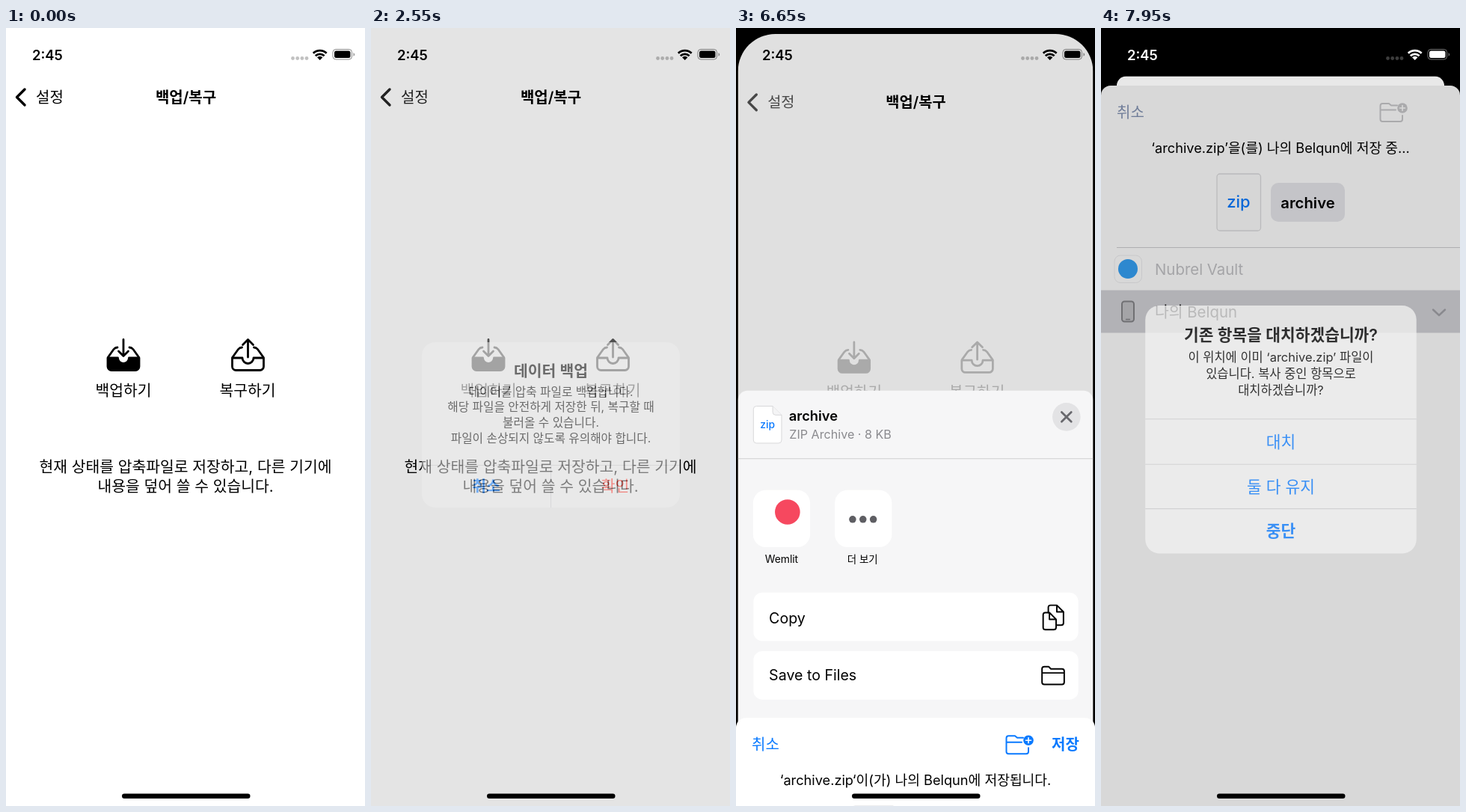
Animation, 480 px wide and 1040 px high, one loop 8000 ms. Source, as an HTML page:

```html
<!DOCTYPE html>
<html lang="ko">
<head>
<meta charset="utf-8">
<title>백업/복구</title>
<style>
  html, body { margin: 0; width: 100%; height: 100%; overflow: hidden; background: #000; }
  svg { display: block; width: 100%; height: 100%; }
  text { font: 20.4px Inter, 'Noto Sans CJK KR', sans-serif; fill: currentColor; }
  .mid { text-anchor: middle; }
  .bold { font-weight: 600; }
  .msg text { font-size: 15.7px; }
  .line { fill: none; stroke: currentColor; stroke-width: 2.8; stroke-linecap: round; stroke-linejoin: round; }
  .thin { stroke-width: 2; }
  .rule { stroke: #cfcfd1; stroke-width: 1; }
  .blue { color: #0a7aff; }
  .red { color: #ff3b30; }
  .grey { color: #8a8a8e; }
  .busy .cancel { color: #8494b4; }
  .busy .folder { color: #c8c8cb; }
  .busy .phone { color: #848488; }
</style>
</head>
<body>
<svg viewBox="0 0 480 1040">
  <defs>
    <clipPath id="cardClip"><rect id="cardShape" width="480" height="1040"/></clipPath>
    <path id="tray" d="M136.500 440L144 429.500Q146 427 149 427M165 427Q168 427 170 429.500L177.500 440"/>
    <path id="box" d="M136 441H149.500a7.500 7.500 0 0 0 15 0H178V452.500a5 5 0 0 1-5 5H141a5 5 0 0 1-5-5Z"/>
  </defs>
  <rect width="480" height="1040"/>

  <g id="card" clip-path="url(#cardClip)">
    <rect width="480" height="1040" fill="#fff"/>
    <rect width="480" height="1040" id="pageDim"/>
    <g id="back">
      <path class="line" style="stroke-width:3.4" d="M25 82L14.500 92.500L25 103"/>
      <text x="40" y="99.500" style="font-size:20px">설정</text>
    </g>
    <text class="mid bold" x="240.500" y="99.500" style="font-size:20px">백업/복구</text>
    <g id="actions">
      <g class="line">
        <use href="#tray"/>
        <use href="#box" fill="currentColor"/>
        <path d="M157 416.500V437M150.500 432L157 438.500L163.500 432"/>
        <g transform="translate(166.500 0)">
          <use href="#tray"/>
          <use href="#box"/>
          <path d="M157 417V440M150 423.500L157 416.500L164 423.500"/>
        </g>
      </g>
      <text class="mid" x="157" y="491.500">백업하기</text>
      <text class="mid" x="323" y="491.500">복구하기</text>
    </g>
    <text class="mid" x="240" y="593.500">현재 상태를 압축파일로 저장하고, 다른 기기에</text>
    <text class="mid" x="240" y="620">내용을 덮어 쓸 수 있습니다.</text>

    <g id="share">
      <rect y="482" width="480" height="620" rx="13" fill="#f6f6f7"/>
      <path d="M21 507a4 4 0 0 1 4-4H47L59 515V549a4 4 0 0 1-4 4H25a4 4 0 0 1-4-4Z" fill="#fff" stroke="#d8d8da"/>
      <path d="M47 503V511a4 4 0 0 0 4 4H59" fill="#f4f4f5" stroke="#d8d8da"/>
      <text class="mid blue" x="40" y="533" style="font-size:14px;font-weight:500">zip</text>
      <text class="bold" x="69" y="522.500" style="font-size:18.500px">archive</text>
      <text class="grey" x="69.500" y="547" style="font-size:16.300px">ZIP Archive · 8 KB</text>
      <circle cx="444" cy="517.500" r="19" fill="#e3e3e5"/>
      <path class="line" d="M437.500 511L450.500 524M450.500 511L437.500 524" style="color:#68686d"/>
      <path class="rule" d="M0 574H480"/>
      <g fill="#fff">
        <rect x="20.500" y="616.500" width="77" height="77" rx="17"/>
        <rect x="131" y="616.500" width="77" height="77" rx="17"/>
        <rect x="21" y="755" width="439" height="65.500" rx="12"/>
        <rect id="saveRow" x="21" y="834" width="439" height="65.500" rx="12"/>
      </g>
      <circle cx="67" cy="646" r="17" fill="#f6485f"/>
      <g fill="#5e5e63">
        <circle cx="155" cy="656" r="4.800"/><circle cx="169" cy="656" r="4.800"/><circle cx="183" cy="656" r="4.800"/>
      </g>
      <text class="mid" x="59" y="714.500" style="font-size:14px">Wemlit</text>
      <text class="mid" x="168.500" y="714.500" style="font-size:13.600px">더 보기</text>
      <text x="42" y="796.500" style="font-size:19.800px">Copy</text>
      <text x="42" y="873.500" style="font-size:19.800px">Save to Files</text>
      <g class="line thin">
        <path d="M412.500 785a3 3 0 0 1 3-3H421L430 791V802a3 3 0 0 1-3 3H415.500a3 3 0 0 1-3-3ZM421 782V791H430"/>
        <path d="M419.500 782V775a3 3 0 0 1 3-3H431L440 781V796a3 3 0 0 1-3 3H430M431 772V781H440"/>
        <path d="M411 875V858a3 3 0 0 1 3-3H420L423 858H438a3 3 0 0 1 3 3V876a3 3 0 0 1-3 3H414a3 3 0 0 1-3-3ZM411 863.500H441"/>
      </g>
    </g>
  </g>

  <g id="files">
    <rect y="77" width="480" height="1000" rx="13" fill="#fff"/>
    <text class="blue cancel" x="21" y="120" style="font-size:20px">취소</text>
    <g id="folder" class="blue folder">
      <path class="line thin" d="M384 103.500H376L373 101H364.500a3 3 0 0 0-3 3V122a3 3 0 0 0 3 3H388a3 3 0 0 0 3-3V117M361.500 109.500H382"/>
      <circle cx="391" cy="107" r="6.800" fill="currentColor"/>
      <path class="line" d="M387.500 107H394.500M391 103.500V110.500" style="stroke:#fff;stroke-width:1.600"/>
    </g>
    <text id="save" class="blue bold" x="422" y="120" style="font-size:20px">저장</text>
    <text id="info" class="mid" x="240" y="167" style="font-size:18.200px"></text>
    <rect x="155" y="195" width="58.500" height="76" rx="4" fill="#fdfdfd" stroke="#dcdcde" stroke-width="1.300"/>
    <text class="mid blue" x="184" y="240" style="font-size:22px;font-weight:500">zip</text>
    <rect x="227" y="207" width="99" height="52" rx="10" fill="#e7e7ec"/>
    <text class="mid bold" x="276.500" y="240.500" style="font-size:20.300px">archive</text>
    <path class="rule" d="M21 293.500H480"/>
    <rect x="18" y="304" width="36.500" height="36.500" rx="8" fill="#fff" stroke="#ececee"/>
    <circle cx="36" cy="322" r="13" fill="#35a0f4"/>
    <text x="72" y="330" style="color:#c2c2c5">Nubrel Vault</text>
    <rect y="350.500" width="480" height="57" fill="#d2d2d7"/>
    <g class="blue phone">
      <rect x="28" y="365.500" width="16" height="27" rx="3.500" fill="currentColor" fill-opacity=".22" stroke="currentColor" stroke-width="2"/>
      <path class="line" d="M33.500 389.500H38.500" style="stroke-width:1.300"/>
    </g>
    <text x="72" y="386.500">나의 Belqun</text>
    <path class="line" d="M444 376.500L452 384L460 376.500" style="color:#a2a2a8;stroke-width:2.400"/>
  </g>

  <path id="screenDim"/>

  <g id="status">
    <text class="bold" x="35" y="42.500" style="font-size:18.400px">2:45</text>
    <g fill="currentColor">
      <g opacity=".24"><circle cx="383.500" cy="40.500" r="2.400"/><circle cx="389.700" cy="40.500" r="2.400"/><circle cx="395.900" cy="40.500" r="2.400"/><circle cx="402" cy="40.500" r="2.400"/></g>
      <path d="M416 39.300a5 5 0 0 1 7.400 0L419.700 43Z"/>
      <rect x="439" y="30.500" width="21.500" height="9.500" rx="2.500"/>
      <path d="M464.500 33a2.600 2.600 0 0 1 0 4.800Z" opacity=".45"/>
    </g>
    <path class="line" style="stroke-width:2.800;stroke-linecap:butt" d="M410.800 33.800a12.600 12.600 0 0 1 17.800 0M413.800 37.200a8.400 8.400 0 0 1 11.800 0"/>
    <rect x="437" y="28.500" width="25.500" height="13.500" rx="4" fill="none" stroke="currentColor" opacity=".45"/>
  </g>

  <g id="backupAlert">
    <rect x="68" y="420" width="345" height="221" rx="18" fill="#eee"/>
    <text class="mid bold" x="240.500" y="465.500">데이터 백업</text>
    <g class="mid msg">
      <text x="240.500" y="491.500">데이터를 압축 파일로 백업합니다.</text>
      <text x="240.500" y="512">해당 파일을 안전하게 저장한 뒤, 복구할 때</text>
      <text x="240.500" y="532.500">불러올 수 있습니다.</text>
      <text x="240.500" y="553.500">파일이 손상되지 않도록 유의해야 합니다.</text>
    </g>
    <path class="rule" d="M68 584.500H413M240.500 584.500V641"/>
    <text class="mid bold blue" x="154" y="620">취소</text>
    <text class="mid red" x="326.500" y="620">확인</text>
  </g>

  <g id="replaceAlert">
    <rect x="68" y="379" width="345" height="315.500" rx="18" fill="#f2f2f2"/>
    <text class="mid bold" x="240.500" y="424">기존 항목을 대치하겠습니까?</text>
    <g class="mid msg">
      <text x="240.500" y="450">이 위치에 이미 ‘archive.zip’ 파일이</text>
      <text x="240.500" y="471">있습니다. 복사 중인 항목으로</text>
      <text x="240.500" y="492">대치하겠습니까?</text>
    </g>
    <path class="rule" d="M68 523.500H413M68 581H413M68 637.500H413"/>
    <g class="mid blue">
      <text x="240.500" y="560">대치</text>
      <text x="240.500" y="617">둘 다 유지</text>
      <text class="bold" x="240.500" y="673.500">중단</text>
    </g>
  </g>

  <rect x="155" y="1023.500" width="171.500" height="6.500" rx="3.250"/>
</svg>
<script>
  const LOOP = 8000, STEP = 50;
  const FULL = 'M0 0H480V1040H0Z';
  const SHEET = 'M0 1040V90Q0 77 13 77H467Q480 77 480 90V1040Z';
  const el = id => document.getElementById(id);
  const set = (id, attrs) => {
    for (const k in attrs) el(id).setAttribute(k, attrs[k]);
  };
  const grey = v => `color:rgb(${[v, v, v].map(Math.round)})`;

  // Critically damped spring, 0 to 1
  const spring = (t, start, rate = 18) => {
    const x = Math.max(0, t - start) / 1000 * rate;
    return x > 9.5 ? 1 : 1 - (1 + x) * Math.exp(-x);
  };

  // Alerts shrink into place around their centre
  function placeAlert(id, cy, grow, alpha) {
    const s = 1.215 - 0.215 * grow;
    set(id, {
      opacity: alpha,
      transform: `translate(240.5 ${cy}) scale(${s}) translate(-240.5 ${-cy})`
    });
  }

  function draw(t) {
    const grow = spring(t, 917);
    const leave = t >= 2900 ? 1 : spring(t, 2390, 10);
    const backup = grow * (1 - leave);
    const share = spring(t, 4417);
    const files = spring(t, 6616.6);
    const replace = spring(t, 7796);
    const saving = t >= 7700;
    const tint = Math.max(backup, share);

    placeAlert('backupAlert', 530.5, grow, backup);
    placeAlert('replaceAlert', 536.5, replace, replace);
    set('screenDim', { opacity: 0.2 * Math.max(backup, replace), d: saving ? SHEET : FULL });

    const s = 1 - 0.0875 * files;
    set('card', { transform: `translate(${240 * (1 - s)} ${64.4 * files}) scale(${s})` });
    set('cardShape', { rx: files > 0 ? 56 - 42 * files : 0 });
    set('pageDim', { opacity: 0.12 * share - 0.04 * replace });
    set('back', { style: grey(72 * tint) });
    set('actions', { style: grey(170 * tint) });
    set('share', { transform: `translate(0 ${558 * (1 - share)})` });
    set('saveRow', { fill: t >= 5750 && t < 5850 ? '#d9d9dd' : '#fff' });

    set('files', { transform: `translate(0 ${963 * (1 - files)})`, class: saving ? 'busy' : '' });
    set('folder', { transform: `translate(${saving ? 12 : 0} 0)` });
    set('save', { opacity: saving ? 0 : 1 });
    el('info').textContent = saving
      ? '‘archive.zip’을(를) 나의 Belqun에 저장 중...'
      : '‘archive.zip‘이(가) 나의 Belqun에 저장됩니다.';
    set('status', { style: grey(255 * Math.min(1, Math.max(0, files * 1.5 - 0.4))) });
  }

  const origin = performance.now();
  function tick() {
    const t = (performance.now() - origin) % LOOP;
    draw(Math.floor(t / STEP) * STEP);
    requestAnimationFrame(tick);
  }
  tick();
</script>
</body>
</html>
```
